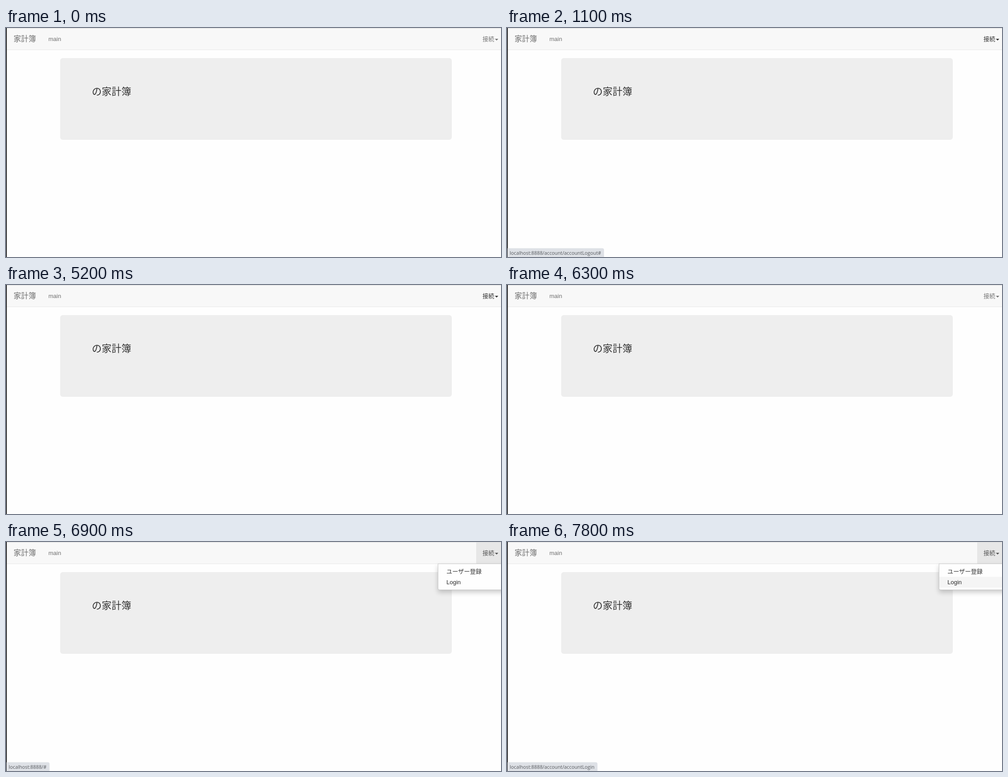
An HTML page with a canvas that plays this animation: 1097 px wide and 510 px high, repeating every 8000 ms.

```html
<!DOCTYPE html>
<html lang="ja">
<head>
<meta charset="utf-8">
<title>家計簿</title>
<style>
html, body { margin: 0; width: 100%; height: 100%; overflow: hidden; background: #fefefe; }
canvas { display: block; }
</style>
</head>
<body>
<canvas id="stage" width="1097" height="510"></canvas>
<script>
const ctx = document.getElementById('stage').getContext('2d');
const LOOP = 8000;
const JP = '"Noto Sans CJK JP", "Noto Sans CJK", sans-serif';
const LATIN = '"Liberation Sans", Arial, sans-serif';
const STATUS = '"Open Sans", sans-serif';
const URLS = {
  logout: ['localhost:8888/account/accountLogout#', 214],
  home: ['localhost:8888/#', 95.5],
  login: ['localhost:8888/account/accountLogin', 199.5]
};

// Each step overrides part of the state from its start time on.
const STEPS = [
  [0, { link: '#777', url: null, alpha: 0, open: false, row: -1 }],
  [500, { link: '#333' }],
  [1000, { url: 'logout', alpha: 0.5 }],
  [1100, { alpha: 1 }],
  [5100, { alpha: 0.5 }],
  [5200, { alpha: 0 }],
  [6300, { link: '#777' }],
  [6400, { link: '#333' }],
  [6700, { url: 'home', alpha: 0.82 }],
  [6800, { alpha: 1 }],
  [6900, { link: '#555', open: true }],
  [7700, { row: 0 }],
  [7800, { row: 1, url: 'login' }]
];

function stateAt(time) {
  return Object.assign({}, ...STEPS.filter(([start]) => start <= time).map(([, change]) => change));
}

function rect(x, y, w, h, color) {
  ctx.fillStyle = color;
  ctx.fillRect(x, y, w, h);
}

function rounded(x, y, w, h, radii, color) {
  ctx.beginPath();
  ctx.roundRect(x, y, w, h, radii);
  ctx.fillStyle = color;
  ctx.fill();
}

function text(str, x, y, size, family, color, weight = 400) {
  ctx.font = `${weight} ${size}px ${family}`;
  ctx.fillStyle = color;
  ctx.fillText(str, x, y);
}

function drawNavbar({ link, open }) {
  rect(0, 0, 1097, 49, '#f8f8f8');
  rect(0, 0, 1097, 1, '#dcdcdc');
  rect(0, 48, 1097, 1, '#e7e7e7');
  if (open) rect(1042, 1, 55, 47, '#e7e7e7');
  text('家計簿', 16.7, 30.3, 16.6, JP, '#6e6e6e', 300);
  text('main', 94, 29, 13, LATIN, '#707070');
  text('接続', 1056, 29, 13, JP, link, 300);
  ctx.beginPath();
  ctx.moveTo(1083.5, 24);
  ctx.lineTo(1091, 24);
  ctx.lineTo(1087.25, 28);
  ctx.fill();
}

function drawMenu(row) {
  ctx.save();
  ctx.shadowColor = 'rgba(0,0,0,0.2)';
  ctx.shadowBlur = 11;
  ctx.shadowOffsetY = 5.5;
  rounded(957, 48, 150, 59, [0, 0, 0, 4], '#c8c8c8');
  ctx.restore();
  rounded(958, 49, 150, 57, [0, 0, 0, 3], '#fefefe');
  if (row >= 0) rect(958, 53 + row * 24.5, 139, 24, '#f5f5f5');
  text('ユーザー登録', 976, 70, 13, JP, '#333', 300);
  text('Login', 976, 93.5, 13, LATIN, '#2c2c2c');
}

function drawStatus(url, alpha) {
  const [label, width] = URLS[url];
  ctx.globalAlpha = alpha;
  rounded(1, 490.5, width, 20, [0, 4, 0, 0], '#dee1e6');
  text(label, 6, 505, 10.8, STATUS, '#55585d');
  ctx.globalAlpha = 1;
}

function draw(now) {
  const state = stateAt(now % LOOP);
  rect(0, 0, 1097, 510, '#fefefe');
  drawNavbar(state);
  rounded(120, 67, 868, 182, 6, '#eee');
  text('の家計簿', 190.3, 149.3, 21.8, JP, '#333', 300);
  if (state.open) drawMenu(state.row);
  rect(0, 0, 1.6, 510, '#000');
  if (state.alpha) drawStatus(state.url, state.alpha);
}

const begin = performance.now();
function tick() {
  draw(performance.now() - begin);
  requestAnimationFrame(tick);
}
tick();
</script>
</body>
</html>
```
